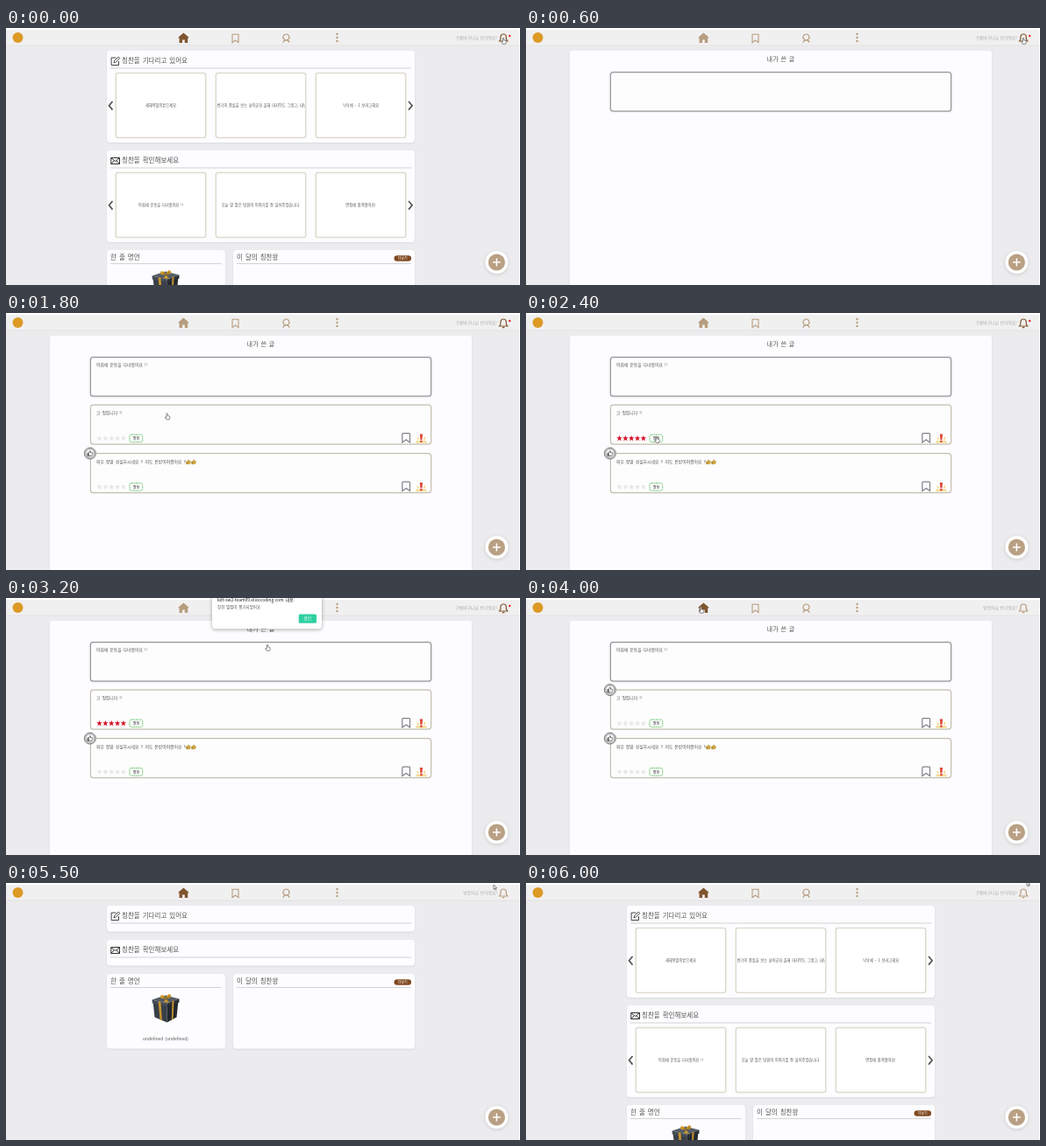
These frames come from a looping animation (586 px wide and 294 px high, 6.1 s). An HTML page:

```html
<!DOCTYPE html>
<html lang="ko">
<head>
<meta charset="utf-8">
<style>
  html, body { margin: 0; width: 100%; height: 100%; overflow: hidden; background: #ecebed; }
  svg { display: block; width: 586px; height: 294px; }
  text { font-family: "Noto Sans CJK KR", "Noto Sans CJK", sans-serif; font-weight: 300; white-space: pre; word-spacing: .12em; }
  .panel { fill: #fdfcfe; filter: drop-shadow(0 1px 1px #0001); }
</style>
</head>
<body>
<svg id="stage" viewBox="0 0 586 294"></svg>
<script>
const LOOP = 6100, STEP = 100;
const TAN = '#b79d7f', BROWN = '#80562f';
const stage = document.getElementById('stage');

// Drawing helpers; text is centred vertically on y.
const text = (x, y, s, size, fill = '#555', attrs = '') =>
  `<text x="${x}" y="${y + size * .37}" font-size="${size}" fill="${fill}" ${attrs}>${s}</text>`;
const middle = (x, y, s, size, fill, attrs = '') => text(x, y, s, size, fill, 'text-anchor="middle" ' + attrs);
const rect = (x, y, w, h, r, attrs) => `<rect x="${x}" y="${y}" width="${w}" height="${h}" rx="${r}" ${attrs}/>`;
const circle = (x, y, r, attrs) => `<circle cx="${x}" cy="${y}" r="${r}" ${attrs}/>`;
const path = (d, attrs) => `<path d="${d}" ${attrs}/>`;
const line = (d, color, width = 1) => path(d, `fill="none" stroke="${color}" stroke-width="${width}"`);
const at = (x, y, s, scale = 1) => `<g transform="translate(${x} ${y}) scale(${scale})">${s}</g>`;
const panel = (x, y, w, h) => rect(x, y, w, h, 4, 'class="panel"');

const THUMB = 'M-3.5 -.5H-2V3.5H-3.5ZM-2 0 L0 -3.6 Q1.4 -3.4 .8 -1H3.2Q4 -.4 3.3 .4Q3.6 1.2 3 1.8Q3 3.3 1.8 3.5H-2Z';
const HAND = 'M-.8 .8Q0 -.4 .8 .8V3.4L3.4 4.2Q4.2 4.6 3.8 6L3 8.6H-.9L-2.8 5.6Q-2.4 4.6 -.8 5.8Z';
const ARROW = 'M0 0V6L1.4 4.8L2.4 7L3.4 6.5L2.5 4.4H4.2Z';
const STAR = 'M' + Array.from({ length: 10 }, (_, i) => {
  const r = i % 2 ? 1.5 : 3.4, a = i * Math.PI / 5;
  return `${(r * Math.sin(a)).toFixed(2)} ${(-r * Math.cos(a)).toFixed(2)}`;
}).join('L') + 'Z';

function navBar(homeActive, guest, dot) {
  const user = guest ? '방문자님' : '구름바구니님';
  return rect(0, 0, 586, 2, 0, 'fill="#fff"') + rect(0, 2, 585, 18, 0, 'fill="#f1f0f0"') +
    line('M0 20H585', '#e0dfe0', .8) +
    circle(13.5, 11, 6, 'fill="#dc9a25"') +
    path('M202.4 5.6L196.6 10.6V11.6H197.6V17H201V13.4H203.8V17H207.2V11.6H208.2V10.6Z', `fill="${homeActive ? BROWN : TAN}"`) +
    line('M258 7.3H265V16.6L261.5 14L258 16.6Z', TAN, 1.1) +
    line('M319.5 7A3.5 3.5 0 1 1 319.4 7M316 16.8Q316.3 13.9 319.5 13.9T323 16.8', TAN, 1.2) +
    [7, 11, 15].map(y => circle(377.5, y, 1.2, `fill="${TAN}"`)).join('') +
    text(560, 11.5, user + ' 반가워요!', 4.8, '#aaa', 'text-anchor="end"') +
    line('M562.5 15H571.8L570.3 12.7V10Q570.1 7 567.1 7T563.9 10V12.7ZM565.8 16.7H568.4', dot ? BROWN : TAN, 1.2) +
    (dot ? circle(574.3, 9, 1.2, 'fill="#e02a20"') : '');
}

const addButton = circle(559.4, 268, 13, 'fill="#fff" style="filter:drop-shadow(0 1px 2px #0002)"') +
  circle(559.4, 268, 9.6, 'fill="#b9a084"') + line('M555 268H563.8M559.4 263.6V272.4', '#fff', 1.5);

const gift = path('M-15 -7L1 -3V17L-13 11Z', 'fill="#393f48"') + path('M1 -3L14 -8L12 11L1 17Z', 'fill="#23282f"') +
  path('M-16 -9L1 -5L15 -10L-1 -14Z', 'fill="#555c66"') + path('M-16 -9L1 -5V-1L-15.6 -5Z', 'fill="#454c56"') +
  path('M1 -5L15 -10V-6L1 -1Z', 'fill="#2b3038"') +
  path('M-9 -7.2L-6 -6.5L-4.5 14.7L-7 13.6ZM7 -7.2L9 -8L8 13L6.3 14Z', 'fill="#c4932d"') +
  path('M0 -10Q-9 -10 -6 -14Q-2 -15 0 -10Q1 -16 5 -15Q8 -11 0 -10L4 -5L1 -6L-3 -6Z', 'fill="#cf9b2b"') +
  line('M-3.5 -12L0 -10L4 -13', '#704d12', .8);

function carousel(y, title, icon, full, labels) {
  const card = (label, i) => {
    const x = 125.3 + 114 * i;
    return rect(x, y + 25.5, 102.4, 74, 2.5, 'fill="#fff" stroke="#dfdbcf" stroke-width="1.6"') +
      `<svg x="${x + 1}" y="${y + 26}" width="100.4" height="73">${middle(50.2, 36.3, label, 4.25)}</svg>`;
  };
  return panel(115, y, 351, full ? 105 : 29.5) + at(119.5, y + 6.5, icon) +
    text(132, y + 11.6, title, 7.5) + line(`M119 ${y + 20}H462`, '#c6c6c8', .8) +
    (full ? labels.map(card).join('') +
      line(`M121.5 ${y + 58}L117.5 ${y + 62.8}L121.5 ${y + 67.6}M459 ${y + 58}L463 ${y + 62.8}L459 ${y + 67.6}`, '#555', 1.7) : '');
}

const pencil = line('M6 1.5H.6V10H9V5.5M3.5 7.3L4 5.2L8.7 .5L10.3 2L5.5 6.8Z', '#333', .9);
const envelope = line('M.3 2H10V9H.3ZM.3 2.2L5.1 6L10 2.2M.3 9L3.8 5.2M10 9L6.5 5.2', '#333', 1);

function homePage(full) {
  const second = full ? 140 : 65, third = full ? 254 : 104;
  return carousel(26, '칭찬을 기다리고 있어요', pencil, full,
      ['새해복많이받으세요', '1번기의 결실을 보는 날이군요.올해 마지막도 그렇고, 내년', '낙낙에 ~ 1 보러고해요']) +
    carousel(second, '칭찬을 확인해보세요', envelope, full,
      ['아침에 운동을 다녀왔어요 !!', '오늘 말 많은 팀원의 이야기를 잘 들어주었습니다.', '면접에 합격했어요!']) +
    panel(115, third, 135, 85.5) + panel(259, third, 207, 85.5) +
    text(119, third + 8.5, '한 줄 명언', 7.5) + text(263, third + 8.5, '이 달의 칭찬왕', 7.5) +
    line(`M119 ${third + 15.6}H245.5M263 ${third + 15.6}H462`, '#c6c6c8', .8) +
    rect(442.5, third + 6.2, 19.5, 6.6, 3.3, 'fill="#80491f"') + middle(452.2, third + 9.5, '더보기', 4, '#fff') +
    at(182.5, third + 38.5, gift) + middle(182, third + 74, 'undefined (undefined)', 4.9);
}

function comment(y, message, rated, thumb) {
  const stars = [0, 1, 2, 3, 4].map(i =>
    at(106.5 + 6.85 * i, y + 38.3, path(STAR, `fill="${rated ? '#d4142a' : '#e8e7e8'}"`))).join('');
  const badge = circle(0, 0, 6.5, 'fill="#e4e4e4" stroke="#777"') +
    circle(0, 0, 5, 'fill="#fff" stroke="#777" stroke-width=".7"') +
    at(0, 0, path(THUMB, 'fill="#fff" stroke="#333" stroke-width=".8"'), .85);
  const siren = path('M-7 5.4L-5 2.6H5L7 5.4Z', 'fill="#f3dc9a"') +
    line('M-4.5 -1L-3 1.5M4.5 -1L3 1.5', '#f1ce5c', 1.2) +
    path('M-1.7 -5H1.7L1 1.6H-1Z', 'fill="#dc4a3c"') + circle(0, 3.4, 1.3, 'fill="#dc4a3c"');
  return rect(96.4, y, 388.2, 45, 3, 'fill="#fefdfe" stroke="#c3bfb0" stroke-width="1.2"') +
    text(103, y + 9.6, message, 4.85) +
    stars + rect(141, y + 34, 14.7, 8.6, 2, 'fill="#fff" stroke="#6fca77" stroke-dasharray="2 .5"') +
    middle(148.4, y + 38.4, '별점', 4.1, '#333', 'style="font-weight:500"') +
    line(`M451.8 ${y + 33.5}Q451.8 ${y + 32.5} 452.8 ${y + 32.5}H459.5Q460.5 ${y + 32.5} 460.5 ${y + 33.5}V${y + 43}L456.2 ${y + 40}L451.8 ${y + 43}Z`, '#80828a', 1.2) +
    at(473.4, y + 38.3, siren) + (thumb ? at(95.8, y, badge) : '');
}

function postPage(loaded, rated, thumb) {
  const emoji = at(208, 170.3, path(THUMB, 'fill="#d9ad38" stroke="#8a671b" stroke-width=".5"'), .7);
  return rect(50, 26, 481, 270, 3, 'class="panel"') + middle(290.5, 35.8, '내가 쓴 글', 7.1) +
    rect(96.4, 50.6, 388.2, 44.6, 3, 'fill="#fefdfe" stroke="#98989c" stroke-width="1.2" style="filter:drop-shadow(0 .5px 1px #0002)"') +
    (loaded ? text(103, 59.2, '아침에 운동을 다녀왔어요 !!', 4.85) +
      comment(105.1, '크 멋집니다 !!', rated, thumb) +
      comment(160.6, '와우 정말 성실하시네요 !! 저도 본받아야겠어요 !!', false, true) +
      emoji + at(6, 0, emoji) : '');
}

const alertBox = rect(235, -10, 125, 45.3, 4, 'fill="#fff" style="filter:drop-shadow(0 1px 2px #0005)"') +
  text(241, 1.7, 'kdt-sw2-team09.elicecoding.com 내용:', 4.9, '#222', 'style="font-weight:500"') +
  text(241, 10.6, '칭찬 별점이 평가되었어요', 4.5) +
  rect(333.7, 18.5, 20.3, 10.2, 1.5, 'fill="#2fd0a2"') + middle(343.8, 23.5, '확인', 4.7, '#fff');

// Pointer stops: time, x, y
const stops = [[0, 567, 11], [600, 567, 11], [1100, 275, 66], [1500, 275, 66], [2000, 134, 141], [2200, 149, 141],
  [2800, 149, 141], [3200, 298, 53], [3400, 343, 22], [3600, 343, 22], [3900, 199.5, 10], [4700, 199.5, 10],
  [5500, 556, 2], [6000, 571, -2], [6100, 567, 11]];

function pointer(t) {
  const i = stops.findIndex(s => s[0] > t);
  const [t0, x0, y0] = stops[i - 1], [t1, x1, y1] = stops[i];
  const p = (t - t0) / (t1 - t0), e = p * p * (3 - 2 * p);
  return at(x0 + (x1 - x0) * e, y0 + (y1 - y0) * e,
    path(t < 4700 ? HAND : ARROW, 'fill="#fff" stroke="#555" stroke-width=".8"'), .85);
}

function scene(t) {
  const within = (a, b) => t >= a && t < b;
  const posts = within(500, 4400);
  const reloading = within(5300, 5700);
  const page = posts ? postPage(t >= 1500, within(2100, 3700), t >= 3700)
    : homePage(!within(4400, 4700) && !reloading);
  return page + navBar(!posts || t >= 3900, within(3700, 4200) || reloading, t < 3700) +
    rect(585, 0, 1, 294, 0, 'fill="#fff"') + addButton +
    (within(2900, 3600) ? alertBox : '') + pointer(t);
}

let shown = -1;
function tick() {
  const t = Math.floor(performance.now() % LOOP / STEP) * STEP;
  if (t !== shown) stage.innerHTML = scene(shown = t);
  requestAnimationFrame(tick);
}
tick();
</script>
</body>
</html>
```
